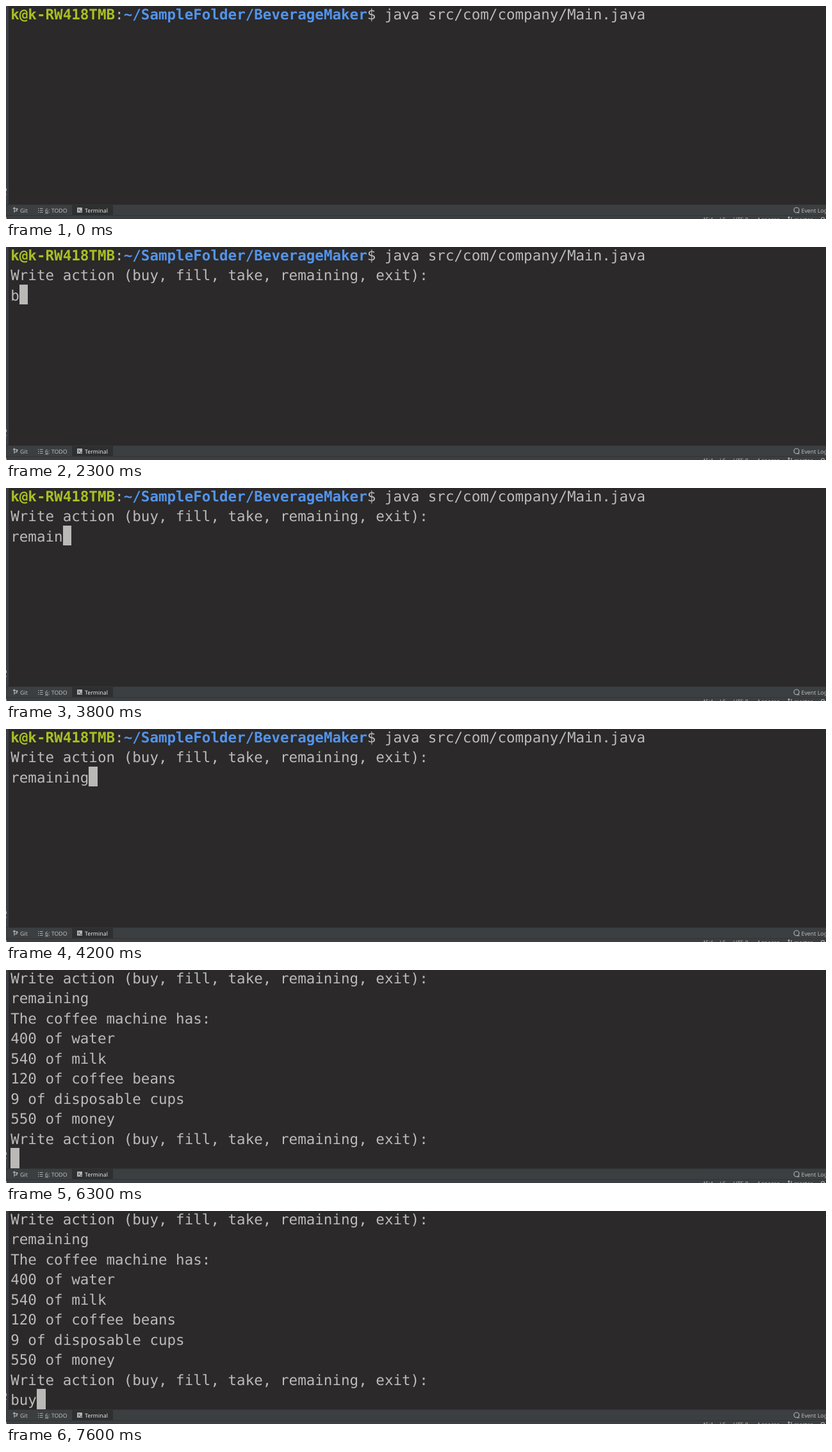
Write an HTML page that moves like this. It is 1280 px wide and 334 px high and loops after 8 s.

```html
<!DOCTYPE html>
<html lang="en">
<head>
<meta charset="utf-8">
<title>Terminal session</title>
<style>
html, body { margin: 0; width: 100%; height: 100%; overflow: hidden; background: #2b2929; }
svg { display: block; width: 1280px; height: 334px; }
rect { shape-rendering: crispEdges; }
text { text-rendering: geometricPrecision; white-space: pre; fill: #bbb; }
.term text { font: 22.55px "DejaVu Sans Mono", monospace; }
.term .user { fill: #a8c023; font-weight: bold; }
.term .path { fill: #5394ec; font-weight: bold; }
.bar text { font: 8.8px "Noto Sans", sans-serif; }
.icon { fill: none; stroke: #afb1b3; stroke-width: 1.2; }
</style>
</head>
<body>
<svg viewBox="0 0 1280 334">
  <rect width="1280" height="334" fill="#2b2929"/>
  <rect width="4" height="312" fill="#3c3f41"/>
  <path d="M0 286h1v4h-1zM0 295h1v1h-1z" fill="#afb1b3"/>
  <g class="term">
    <rect id="cursor" width="13.6" height="31.5" fill="#bbb8b8"/>
    <text id="prompt" x="7.2" y="21"><tspan class="user">k@k-RW418TMB</tspan>:<tspan class="path">~/SampleFolder/BeverageMaker</tspan>$ java src/com/company/Main.java</text>
    <g id="rows"></g>
  </g>
  <g class="bar">
    <rect y="311" width="1280" height="1" fill="#323334"/>
    <rect y="312" width="1280" height="22" fill="#3c3f41"/>
    <rect x="103" y="312" width="64" height="16" fill="#2d2f30"/>
    <rect y="328" width="1280" height="1" fill="#323334"/>
    <rect y="331" width="1" height="3" fill="#afb1b3"/>
    <path class="icon" d="M13 316v8M11 318l2-2 2 2M13 321.5h4v-4M15.5 319l1.5-1.5 1.5 1.5"/>
    <path class="icon" d="M50 317.5h1.5M50 320.5h1.5M50 323.5h1.5M53 317.5h4.5M53 320.5h4.5M53 323.5h4.5"/>
    <rect x="111" y="316" width="8" height="8" fill="#afb1b3"/>
    <path d="M113 318l2 2-2 2M116 322h2.5" fill="none" stroke="#2d2f30"/>
    <circle class="icon" cx="1234" cy="320" r="4"/>
    <path class="icon" d="M1235 324h3.5"/>
    <text x="22" y="323.5">Git</text>
    <text x="61" y="323.5"><tspan text-decoration="underline">6</tspan>: TODO</text>
    <text x="123" y="323.5" style="fill:#e6e6e6">Terminal</text>
    <text x="1241.5" y="323.5">Event Log</text>
    <text x="1087" y="337.5">45:1</text>
    <text x="1114" y="337.5">LF</text>
    <text x="1135" y="337.5">UTF-8</text>
    <text x="1172" y="337.5">4 spaces</text>
    <path class="icon" d="M1222 331v3M1226 331v3M1220.5 332l1.5-1.5 1.5 1.5"/>
    <text x="1230" y="337.5">master</text>
    <circle class="icon" cx="1275" cy="334" r="2.5"/>
  </g>
</svg>
<script>
const LOOP = 8000, COL = 13.575, LINE = 31.5, LEFT = 7.2, BASE = 21;
const $ = id => document.getElementById(id);
const menu = 'Write action (buy, fill, take, remaining, exit):';
const command = $('prompt').textContent;

// Each screen lists the finished lines above the one being typed.
const screens = {
  shell: [],
  running: [command],
  menu: [command, menu],
  report: [menu, 'remaining', 'The coffee machine has:', '400 of water', '540 of milk',
    '120 of coffee beans', '9 of disposable cups', '550 of money', menu]
};

// start time, screen, typed line, cursor visible
const steps = [
  [0, 'shell', command, false],
  [500, 'shell', command, true],
  [700, 'shell', command, false],
  [1000, 'running', '', true],
  [1400, 'menu', '', true],
  [1900, 'menu', '', false],
  [2300, 'menu', 'b', true],
  [2600, 'menu', '', true],
  ...[2800, 2900, 3000, 3300, 3600, 3800, 4000, 4100, 4200]
    .map((t, i) => [t, 'menu', 'remaining'.slice(0, i + 1), true]),
  [5000, 'report', '', true],
  [5700, 'report', '', false],
  [6300, 'report', '', true],
  [6800, 'report', '', false],
  ...[7100, 7200, 7300, 7600].map((t, i) => [t, 'report', 'buy'.slice(0, i), true])
];

// Baselines sit on whole pixels.
const rows = Array.from({ length: 10 }, (_, i) => {
  const row = document.createElementNS('http://www.w3.org/2000/svg', 'text');
  row.setAttribute('x', LEFT);
  row.setAttribute('y', Math.floor(BASE + i * LINE));
  return $('rows').appendChild(row);
});

let shown;
function show([, screen, typed, cursorOn]) {
  const lines = [...screens[screen], typed];
  rows.forEach((row, i) => {
    row.textContent = lines[i] === command ? '' : lines[i] || '';
  });
  $('prompt').style.display = lines[0] === command ? '' : 'none';
  $('cursor').setAttribute('x', LEFT + typed.length * COL);
  $('cursor').setAttribute('y', (lines.length - 1) * LINE - 4.5);
  $('cursor').style.display = cursorOn ? '' : 'none';
}

const start = performance.now();
function tick() {
  const t = (performance.now() - start) % LOOP;
  const step = steps.filter(s => s[0] <= t).pop();
  if (step !== shown) show(shown = step);
  requestAnimationFrame(tick);
}
tick();
</script>
</body>
</html>
```
